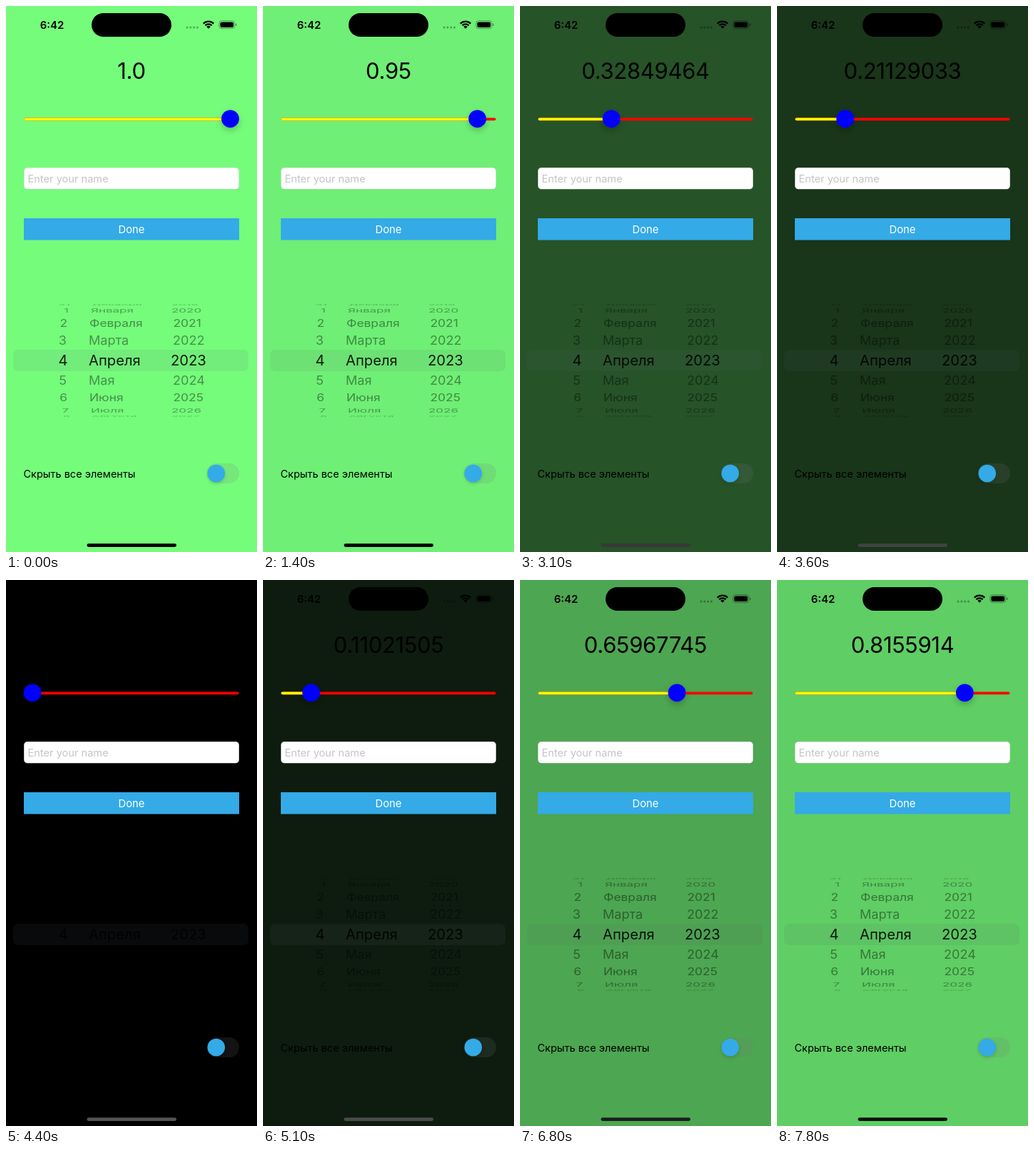
Recreate the animation shown at these times as an HTML page with a canvas. Size 352x764 px, loop 8 s.

```html
<!DOCTYPE html>
<html lang="ru">
<head>
<meta charset="utf-8">
<title>Slider</title>
<style>
html, body { margin: 0; width: 100%; height: 100%; overflow: hidden; background: #000; }
canvas { display: block; width: 352px; height: 764px; }
</style>
</head>
<body>
<canvas id="stage"></canvas>
<script>
const W = 352, H = 764, LOOP = 8000, STEP = 100, MAX = 1860;
const FONT = 'Inter, "Noto Sans", sans-serif';
const CYAN = '#34aae7';
const canvas = document.getElementById('stage');
const ctx = canvas.getContext('2d');
const dpr = window.devicePixelRatio || 1;
canvas.width = W * dpr;
canvas.height = H * dpr;

// Slider travel: time in ms, position in 1/1860 of the track
const PATH = [
  [0, 1860], [1300, 1860], [1400, 1767], [1900, 1490], [2000, 1490],
  [2500, 1103], [3100, 611], [3300, 505], [3400, 505], [4300, 0],
  [4800, 0], [6000, 817], [7000, 1330], [7200, 1330], [7800, 1517], [8000, 1517]
];

// Picker rows by distance from the centre
const ROWS = [
  { dy: 0, size: 20.2, sy: 1, alpha: 0.88, day: 86.5, month: 116, year: 231 },
  { dy: 28, size: 18.1, sy: 0.95, alpha: 0.42, day: 85, month: 116, year: 234 },
  { dy: 52, size: 17.4, sy: 0.8, alpha: 0.44, day: 86, month: 117, year: 234.5 },
  { dy: 70, size: 17, sy: 0.48, alpha: 0.36, day: 88, month: 119, year: 232 },
  { dy: 78.3, size: 16.6, sy: 0.16, alpha: 0.24, day: 90, month: 120, year: 232 }
];
const MONTHS = ['Декабря', 'Января', 'Февраля', 'Марта', 'Апреля', 'Мая', 'Июня', 'Июля', 'Августа'];

function sliderAt(ms) {
  const t = Math.floor(ms / STEP) * STEP;
  const i = PATH.findIndex(p => p[0] > t);
  const [t0, a] = PATH[i - 1], [t1, b] = PATH[i];
  const n = a + (b - a) * (t - t0) / (t1 - t0);
  if (n <= 0 || n >= MAX) return n / MAX;
  return (2 * Math.floor(n / 2) + 1) / MAX;
}

// Shortest decimal that names the same 32-bit float
function floatText(v) {
  if (Number.isInteger(v)) return v.toFixed(1);
  const f = Math.fround(v);
  let p = 1;
  while (Math.fround(+f.toPrecision(p)) !== f) p++;
  return String(+f.toPrecision(p));
}

function box(x, y, w, h, r, fill) {
  ctx.beginPath();
  ctx.roundRect(x, y, w, h, r);
  ctx.fillStyle = fill;
  ctx.fill();
}

function disc(x, y, r, fill) {
  ctx.beginPath();
  ctx.arc(x, y, r, 0, Math.PI * 2);
  ctx.fillStyle = fill;
  ctx.fill();
}

// Text whose capitals are centred on cy
function text(str, x, cy, size, { align = 'left', fill = '#000', weight = 400, gap = 0, sy = 1 } = {}) {
  ctx.save();
  ctx.translate(x, cy);
  ctx.scale(1, sy);
  ctx.font = `${weight} ${size}px ${FONT}`;
  ctx.letterSpacing = gap + 'px';
  ctx.textAlign = align;
  ctx.fillStyle = fill;
  ctx.fillText(str, 0, size * 0.364);
  ctx.restore();
}

function shadowed(color, blur, dy, draw) {
  ctx.save();
  ctx.shadowColor = color;
  ctx.shadowBlur = blur * dpr;
  ctx.shadowOffsetY = dy * dpr;
  draw();
  ctx.restore();
}

function statusBar() {
  box(120, 10, 112, 33, 16.5, '#000');
  text('6:42', 64.5, 26.3, 15, { align: 'center', weight: 600 });
  for (let i = 0; i < 4; i++) disc(254 + i * 4.8, 30, 1.5, 'rgba(0,0,0,.32)');

  const cx = 284, cy = 31.8, a0 = -Math.PI * 0.75, a1 = -Math.PI * 0.25;
  ctx.strokeStyle = '#000';
  ctx.lineWidth = 2.3;
  for (const r of [10.2, 6.5]) {
    ctx.beginPath();
    ctx.arc(cx, cy, r, a0, a1);
    ctx.stroke();
  }
  ctx.beginPath();
  ctx.moveTo(cx, cy);
  ctx.arc(cx, cy, 3.9, a0, a1);
  ctx.fillStyle = '#000';
  ctx.fill();

  ctx.beginPath();
  ctx.roundRect(298.8, 20.8, 22, 10.8, 3.6);
  ctx.strokeStyle = 'rgba(0,0,0,.38)';
  ctx.lineWidth = 1;
  ctx.stroke();
  box(300.4, 22.4, 18.8, 7.6, 2.2, '#000');
  box(322, 24.4, 1.4, 3.6, 0.7, 'rgba(0,0,0,.42)');
}

function slider(v) {
  const x = 37 + 277.5 * v;
  box(25.5, 156.6, 301, 3.6, 1.8, '#f00');
  if (x > 38) box(25.5, 156.6, x - 25.5, 3.6, 1.8, '#ff0');
  shadowed('rgba(0,0,0,.22)', 8, 4, () => disc(x, 157.8, 12.4, '#00f'));
}

function form() {
  box(25, 226, 302, 30.5, 4.8, 'rgba(205,205,205,.7)');
  box(25.5, 226.5, 301, 29.5, 4.4, '#fff');
  text('Enter your name', 30.5, 242, 14.6, { fill: '#c4c4c6' });
  box(25, 297, 302, 30.5, 0, CYAN);
  text('Done', 176, 312.8, 14.8, { align: 'center', fill: '#fff' });
}

function picker() {
  box(10, 481, 330, 30, 7, 'rgba(90,100,110,.1)');
  for (let k = -4; k <= 4; k++) {
    const row = ROWS[Math.abs(k)];
    const y = 496 + Math.sign(k) * row.dy;
    const look = { fill: `rgba(0,0,0,${row.alpha})`, sy: row.sy };
    text(k === -4 ? '31' : String(4 + k), row.day, y, row.size, { ...look, align: 'right' });
    text(MONTHS[4 + k], row.month, y, row.size, look);
    text(String(2023 + k), row.year, y, row.size, look);
  }
}

function toggle() {
  text('Скрыть все элементы', 24.5, 654.8, 14.5);
  box(281.5, 640, 45.5, 28, 14, 'rgba(116,116,124,.16)');
  shadowed('rgba(0,0,0,.14)', 5, 2, () => disc(294.8, 654, 12.3, CYAN));
}

function draw(ms) {
  const v = sliderAt(ms);
  const rgb = [117, 252, 123].map(c => Math.round(c * v));
  ctx.setTransform(dpr, 0, 0, dpr, 0, 0);
  ctx.fillStyle = `rgb(${rgb})`;
  ctx.fillRect(0, 0, W, H);
  statusBar();
  text(floatText(v), 176, 90.3, 31, { align: 'center', gap: -0.3 });
  slider(v);
  form();
  picker();
  toggle();
  const g = Math.round(84 * (1 - v));
  box(113.5, 752.3, 125.5, 4.6, 2.3, `rgb(${g},${g},${g})`);
}

const start = performance.now();
function tick() {
  draw((performance.now() - start) % LOOP);
  requestAnimationFrame(tick);
}
tick();
</script>
</body>
</html>
```
